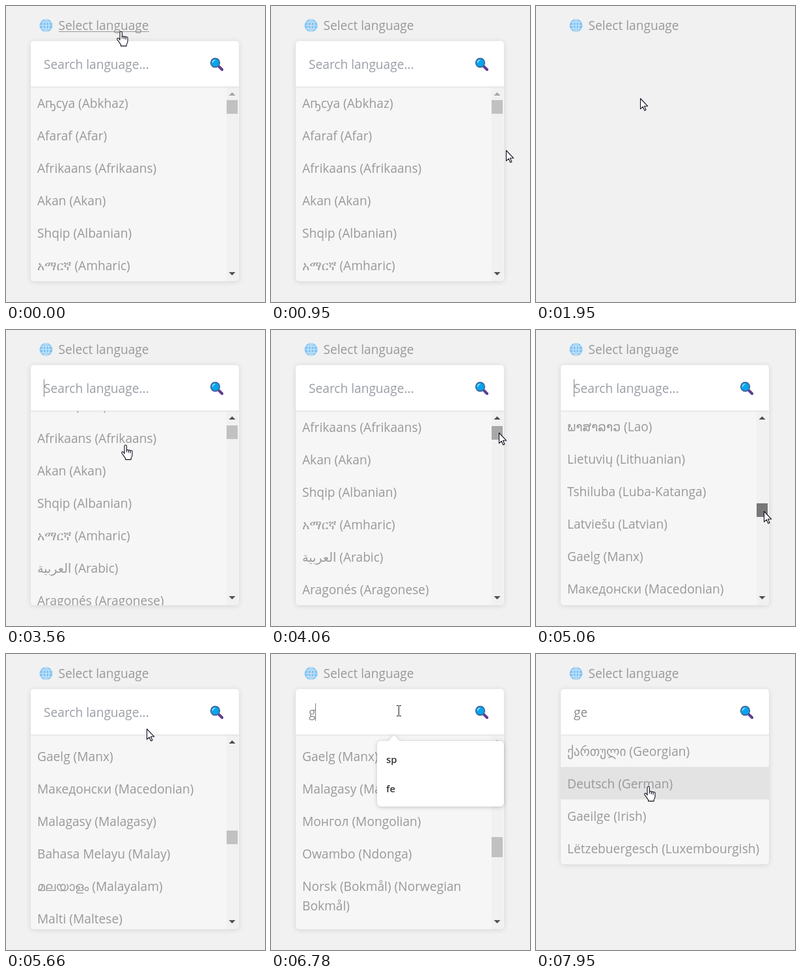
An HTML page with a canvas that plays this animation: 398 px wide and 456 px high, repeating every 8000 ms.

```html
<!DOCTYPE html>
<html lang="en">
<head>
<meta charset="utf-8">
<title>Language picker</title>
<style>
html, body { margin: 0; width: 100%; height: 100%; overflow: hidden; background: #f1f1f1; }
canvas { display: block; }
</style>
</head>
<body>
<canvas id="stage" width="398" height="456"></canvas>
<script>
const ctx = document.getElementById('stage').getContext('2d');
const LOOP = 8000, STEP = 10;
const FAMILY = '"Open Sans", "Noto Sans", "DejaVu Sans", "Noto Sans CJK SC", sans-serif';
const FONT = '19.15px ' + FAMILY;
const LEFT = 38, RIGHT = 358, HEAD = 54, LIST = 124;

const languages = `Аҧсуа (Abkhaz)|Afaraf (Afar)|Afrikaans (Afrikaans)|Akan (Akan)|Shqip (Albanian)
|አማርኛ (Amharic)|العربية (Arabic)|Aragonés (Aragonese)|Հայերեն (Armenian)|অসমীয়া (Assamese)
|Авар мацӀ (Avaric)|Avesta (Avestan)|Aymar aru (Aymara)|Azərbaycan dili (Azerbaijani)
|Bamanankan (Bambara)|Башҡорт теле (Bashkir)|Euskara (Basque)|Беларуская (Belarusian)
|বাংলা (Bengali)|भोजपुरी (Bihari)|Bislama (Bislama)|Bosanski jezik (Bosnian)|Brezhoneg (Breton)
|Български език (Bulgarian)|ဗမာစာ (Burmese)|Català (Catalan; Valencian)|Chamoru (Chamorro)
|Нохчийн мотт (Chechen)|ChiCheŵa (Chichewa; Chewa; Nyanja)|中文 (Chinese)|Чӑваш чӗлхи (Chuvash)
|Kernewek (Cornish)|Corsu (Corsican)|ᓀᐦᐃᔭᐍᐏᐣ (Cree)|Hrvatski (Croatian)|Česky (Czech)|Dansk (Danish)
|ދިވެހި (Divehi; Dhivehi; Maldivian;)|Nederlands (Dutch)|English (English)|Esperanto (Esperanto)
|Eesti (Estonian)|Eʋegbe (Ewe)|Føroyskt (Faroese)|Vosa Vakaviti (Fijian)|Suomi (Finnish)
|Français (French)|Fulfulde (Fula; Fulah; Pulaar; Pular)|Galego (Galician)|ქართული (Georgian)
|Deutsch (German)|Ελληνικά (Greek, Modern)|Avañeẽ (Guaraní)|ગુજરાતી (Gujarati)
|Kreyòl ayisyen (Haitian; Haitian Creole)|هَوُسَ (Hausa)|עברית (Hebrew)|Otjiherero (Herero)
|हिन्दी (Hindi)|Hiri Motu (Hiri Motu)|Magyar (Hungarian)|Interlingua (Interlingua)
|Bahasa Indonesia (Indonesian)|Interlingue (Interlingue)|Gaeilge (Irish)|Asụsụ Igbo (Igbo)
|Iñupiaq (Inupiaq)|Ido (Ido)|Íslenska (Icelandic)|Italiano (Italian)|ᐃᓄᒃᑎᑐᑦ (Inuktitut)
|日本語 (Japanese)|Basa Jawa (Javanese)|Kalaallisut (Kalaallisut)|ಕನ್ನಡ (Kannada)
|Kanuri (Kanuri)|कश्मीरी (Kashmiri)|Қазақ тілі (Kazakh)|ភាសាខ្មែរ (Khmer)|Gĩkũyũ (Kikuyu, Gikuyu)
|Ikinyarwanda (Kinyarwanda)|Кыргыз тили (Kirghiz)|Коми кыв (Komi)|KiKongo (Kongo)
|한국어 (Korean)|Kurdî (Kurdish)|Kuanyama (Kwanyama, Kuanyama)|Latine (Latin)
|Lëtzebuergesch (Luxembourgish)|Luganda (Luganda)|Limburgs (Limburgish)|Lingála (Lingala)
|ພາສາລາວ (Lao)|Lietuvių (Lithuanian)|Tshiluba (Luba-Katanga)|Latviešu (Latvian)|Gaelg (Manx)
|Македонски (Macedonian)|Malagasy (Malagasy)|Bahasa Melayu (Malay)|മലയാളം (Malayalam)
|Malti (Maltese)|Te reo Māori (Māori)|मराठी (Marathi)|Kajin M̧ajeļ (Marshallese)
|Монгол (Mongolian)|Ekakairũ Naoero (Nauru)|Owambo (Ndonga)|Norsk (Bokmål) (Norwegian Bokmål)
|Norsk (Nynorsk) (Norwegian Nynorsk)`.split('|').map(s => s.trim());

function wrap(text, width) {
  const lines = [''];
  for (const word of text.split(' ')) {
    const last = lines.length - 1;
    const next = lines[last] ? lines[last] + ' ' + word : word;
    if (lines[last] && ctx.measureText(next).width > width) lines.push(word);
    else lines[last] = next;
  }
  return lines;
}

function buildList(query, width) {
  let top = 0;
  ctx.font = FONT;
  return languages.filter(s => s.toLowerCase().includes(query)).map(text => {
    const lines = wrap(text, width);
    const row = { text, lines, top, height: 20 + 30 * lines.length };
    top += row.height;
    return row;
  });
}

const lists = { '': buildList('', 281), g: buildList('g', 281), ge: buildList('ge', 310) };
const topOf = (query, name) => lists[query].find(r => r.text.includes('(' + name + ')')).top;

// Keys are [time, ...values]; each stretch runs with the given easing.
const smooth = p => p * p * (3 - 2 * p);
const linear = p => p;
function sample(keys, t, ease = smooth) {
  if (t <= keys[0][0]) return keys[0].slice(1);
  for (let i = 1; i < keys.length; i++) {
    const a = keys[i - 1], b = keys[i];
    if (t < b[0]) {
      const p = ease((t - a[0]) / (b[0] - a[0]));
      return a.slice(1).map((v, k) => v + (b[k + 1] - v) * p);
    }
  }
  return keys[keys.length - 1].slice(1);
}

const pointerKeys = [
  [0, 176, 39], [200, 344, 112], [350, 348, 220], [780, 348, 220], [960, 361, 222],
  [1080, 361, 222], [1600, 166, 244], [1660, 166, 244], [1950, 160, 142], [2130, 172, 40],
  [2230, 172, 40], [2450, 178, 180], [2750, 178, 180], [3110, 183, 177], [3760, 183, 177],
  [4060, 350, 158], [4110, 350, 158], [4460, 350, 239], [5060, 350, 279], [5260, 350, 284],
  [5340, 350, 284], [5760, 194, 87], [5960, 194, 87], [6060, 196, 87], [7450, 196, 87], [7900, 172, 204]
];
const scrollKeys = [
  [3400, 0], [3560, 83], [3640, 100], [4110, 100], [4460, topOf('', 'Hebrew') - 33],
  [5060, topOf('', 'Lao') + 1], [5260, topOf('', 'Manx') - 8]
];
const openKeys = [[2220, LIST], [2400, 258], [2750, 258], [2850, 424]];
const caretSpans = [[50, 550], [2230, 2500], [3030, 3600], [4140, 5200], [5730, 6260], [6410, 6940], [7030, 7290]];
const within = (t, a, b) => t >= a && t < b;

function text(s, x, y, color, font = FONT) {
  ctx.font = font;
  ctx.fillStyle = color;
  ctx.fillText(s, x, y);
}

function box(x, y, w, h, color) {
  ctx.fillStyle = color;
  ctx.fillRect(x, y, w, h);
}

function roundBox(x, y, w, h, r, color) {
  ctx.beginPath();
  ctx.roundRect(x, y, w, h, r);
  ctx.fillStyle = color;
  ctx.fill();
}

function withShadow(alpha, blur, dy, draw) {
  ctx.save();
  ctx.shadowColor = `rgba(0,0,0,${alpha})`;
  ctx.shadowBlur = blur;
  ctx.shadowOffsetY = dy;
  draw();
  ctx.restore();
}

function triangle(x, y, w, h, color) {
  ctx.beginPath();
  ctx.moveTo(x - w, y + h);
  ctx.lineTo(x, y);
  ctx.lineTo(x + w, y + h);
  ctx.fillStyle = color;
  ctx.fill();
}

function drawGlobe(x, y) {
  ctx.save();
  ctx.translate(x, y);
  ctx.beginPath();
  ctx.arc(0, 0, 10, 0, 7);
  ctx.fillStyle = '#80c4f4';
  ctx.fill();
  ctx.clip();
  ctx.strokeStyle = '#d8ebf7';
  ctx.lineWidth = 1.1;
  ctx.beginPath();
  ctx.ellipse(0, 0, 4.7, 9.3, 0, 0, 7);
  for (const d of [-5, 0, 5]) {
    ctx.moveTo(-9, d);
    ctx.lineTo(9, d);
  }
  ctx.moveTo(0, -9);
  ctx.lineTo(0, 9);
  ctx.stroke();
  ctx.restore();
}

function drawLens() {
  ctx.lineCap = 'round';
  ctx.strokeStyle = '#5d3f92';
  ctx.lineWidth = 4.2;
  ctx.beginPath();
  ctx.moveTo(327.5, 93.5);
  ctx.lineTo(332, 98);
  ctx.stroke();
  ctx.lineWidth = 1.5;
  ctx.strokeStyle = '#46608f';
  ctx.beginPath();
  ctx.arc(321.5, 87.5, 6.9, 0, 7);
  ctx.fillStyle = '#06a3ee';
  ctx.fill();
  ctx.stroke();
  ctx.strokeStyle = '#8edcfa';
  ctx.lineWidth = 1.6;
  ctx.beginPath();
  ctx.arc(321.5, 87.5, 4, 3.3, 4.5);
  ctx.stroke();
  ctx.lineCap = 'butt';
}

const arrowShape = new Path2D('M.5.5V16.6L4.2 13.2 6.8 19 9 18 6.5 12.3H11.8z');
const handShape = new Path2D('M5 13.5V2a1.7 1.7 0 0 1 3.4 0v6.2a1.6 1.6 0 0 1 2.9.6a1.5 1.5 0 0 1 2.8.8' +
  'a1.5 1.5 0 0 1 2.9 1v5q0 2.4-1.8 4.4v2.6H6.5v-2Q4.5 17.5 1 12.8q-.8-1.6.7-2.2q1.2-.3 2 .7z');

function drawPointer(kind, x, y) {
  ctx.save();
  x = Math.round(x);
  y = Math.round(y);
  if (kind === 'text') {
    box(x, y - 7, 1, 15, '#222');
    for (const edge of [y - 8, y + 8]) {
      box(x - 3, edge, 3, 1, '#222');
      box(x + 1, edge, 3, 1, '#222');
    }
  } else {
    const hand = kind === 'hand';
    ctx.translate(x - (hand ? 6 : 0), y);
    ctx.fillStyle = '#fff';
    ctx.strokeStyle = '#111122';
    ctx.lineWidth = 1.1;
    ctx.lineJoin = 'round';
    const shape = hand ? handShape : arrowShape;
    ctx.fill(shape);
    ctx.stroke(shape);
    if (hand) {
      ctx.beginPath();
      for (const [kx, ky] of [[8.4, 8.2], [11.3, 9], [14.1, 9.8]]) {
        ctx.moveTo(kx, ky);
        ctx.lineTo(kx, ky + 3);
      }
      ctx.stroke();
    }
  }
  ctx.restore();
}

function drawScrollbar(query, scroll, dragging, x, y) {
  const h = query ? 31 : 21;
  const share = query ? 0.6036 : scroll / 9250;
  const top = Math.round(145 + share * (258 - h));
  const hover = x >= 339 && x < 357 && y >= top && y < top + h;
  box(339, LIST + 1, 18, 300, '#f1f1f1');
  triangle(347.5, 133, 5, 5, scroll > 0 ? '#505050' : '#a3a3a3');
  triangle(347.5, 415, 5, -5, '#505050');
  box(339, top, 17, h, dragging ? '#787878' : hover ? '#a8a8a8' : '#c1c1c1');
}

function drawRows(query, scroll, hoverY) {
  for (const row of lists[query]) {
    const top = LIST + row.top - Math.round(scroll);
    if (top > 430 || top + row.height < LIST) continue;
    if (within(hoverY, top, top + row.height)) box(LEFT, top, RIGHT - LEFT, row.height, '#e3e3e3');
    row.lines.forEach((line, i) => text(line, 48, top + 33 + 30 * i, '#999'));
  }
}

function drawSuggestions() {
  withShadow(0.22, 6, 1, () => {
    ctx.beginPath();
    ctx.roundRect(163, 134, 195, 101, 6);
    ctx.moveTo(180, 134.5);
    ctx.lineTo(189, 125);
    ctx.lineTo(198, 134.5);
    ctx.fillStyle = '#fff';
    ctx.fill();
  });
  const bold = '600 15px ' + FAMILY;
  text('sp', 177, 168, '#333', bold);
  text('fe', 177, 213, '#333', bold);
}

function drawMenu(t, query, x, y, kind) {
  const bottom = t < 1100 ? 424 : query === 'ge' ? 324 : sample(openKeys, t)[0];
  const scroll = query === 'ge' ? 0 : query ? topOf('g', 'Manx') - 8 : sample(scrollKeys, t, linear)[0];
  const still = !within(t, 3400, 3760);
  const hoverY = kind === 'hand' && y > LIST && still ? y : -1;

  withShadow(0.12, 8, 1, () => roundBox(LEFT, HEAD, RIGHT - LEFT, bottom - HEAD, 5, '#f6f6f6'));
  ctx.save();
  ctx.beginPath();
  ctx.roundRect(LEFT, HEAD, RIGHT - LEFT, bottom - HEAD, 5);
  ctx.clip();
  ctx.save();
  ctx.beginPath();
  ctx.rect(LEFT, LIST, RIGHT - LEFT, 300);
  ctx.clip();
  drawRows(query, scroll, hoverY);
  if (query !== 'ge') drawScrollbar(query, scroll, within(t, 4100, 5300), x, y);
  ctx.restore();
  withShadow(0.1, 3, 1, () => box(LEFT, HEAD, RIGHT - LEFT, LIST - HEAD, '#fff'));
  box(LEFT, LIST, RIGHT - LEFT, 1, '#e6e6e6');
  ctx.restore();

  if (query) text(query, 58, 97, '#8c8c8c');
  else text('Search language...', 58, 97, '#9a9ea6');
  if (caretSpans.some(([a, b]) => within(t, a, b))) {
    ctx.font = FONT;
    box(58 + Math.round(ctx.measureText(query).width), 76, 1, 27, '#808080');
  }
  drawLens();
  if (within(t, 6780, 7050)) drawSuggestions();
}

function pointerKind(x, y, open, query) {
  if (within(x, 50, 222) && within(y, 16, 46)) return 'hand';
  if (!open) return 'arrow';
  if (within(x, 56, 300) && within(y, 72, 108)) return 'text';
  const edge = query === 'ge' ? RIGHT : 339;
  return within(x, LEFT, edge) && within(y, LIST + 1, 424) ? 'hand' : 'arrow';
}

function draw(t) {
  const [x, y] = sample(pointerKeys, t);
  const open = t < 1040 || t >= 2220;
  const query = t < 6410 ? '' : t < 7050 ? 'g' : 'ge';
  const kind = pointerKind(x, y, open, query);

  box(0, 0, 398, 456, '#f1f1f1');
  drawGlobe(61.5, 30);
  text('Select language', 80.5, 37, '#999');
  if (kind === 'hand' && y < 46) box(81, 39, 139, 1, '#999');
  if (open) drawMenu(t, query, x, y, kind);
  drawPointer(kind, x, y);
}

function tick() {
  const t = performance.now() % LOOP;
  draw(t - t % STEP);
  requestAnimationFrame(tick);
}
tick();
</script>
</body>
</html>
```
